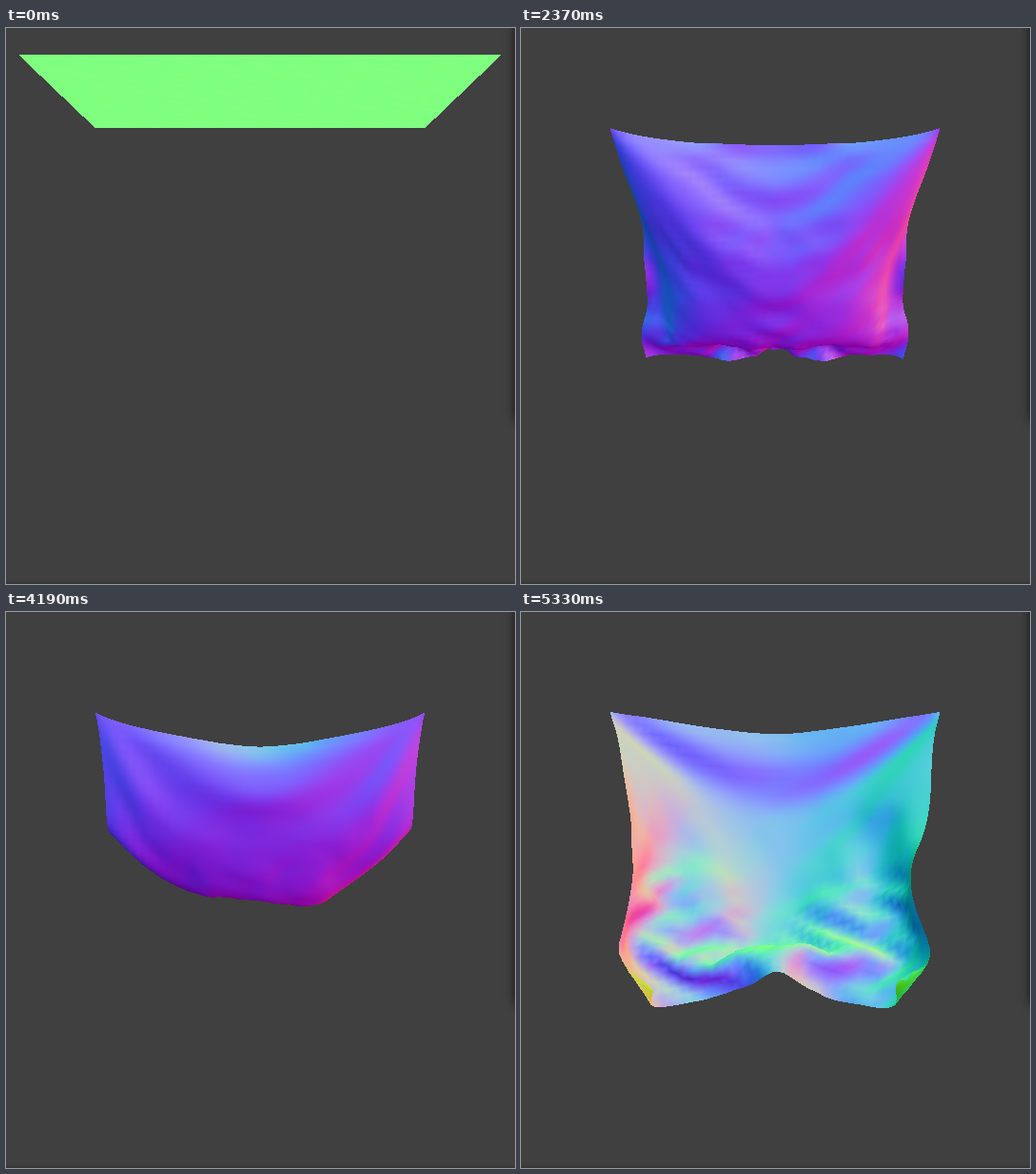
Animation of 535 by 584 pixels, one loop 5.38 s. Source, as an HTML page with a canvas:

```html
<!DOCTYPE html>
<html lang="en">
<head>
<meta charset="utf-8">
<title>Falling cloth</title>
<style>
  html, body { margin: 0; width: 100%; height: 100%; overflow: hidden; background: #404040; }
  canvas { display: block; }
</style>
</head>
<body>
<canvas id="stage" width="535" height="584"></canvas>
<script>
const W = 535, H = 584, LOOP = 5380;
const N = 40, ROW = N + 1, COUNT = ROW * ROW;
const SIZE = 347, PIN_Y = -166, CELL = SIZE / N;
const FOCAL = 1095, CX = 267, CY = 271;
const RATE = 720, DT = 1 / RATE, STEPS = 8;
const GRAVITY = 292, DRAG = 1 - 0.12 * DT, SMOOTH = 0.001, STEER = 0.012;

// Mean path of the free edge: seconds, height, depth
const PATH = [
  [0.99, -20, 303], [1.12, 3, 290], [1.4, 118, 215], [1.66, 218, 82],
  [1.76, 192, 0], [2.23, 95, -170], [2.5, 5, -225], [2.8, -100, -245],
  [2.98, -150, -235], [3.36, -190, -215], [3.65, -200, -205], [3.91, -140, -210],
  [4.19, -15, -215], [4.38, 80, -180], [4.66, 180, -95], [4.86, 212, 20],
  [5, 178, 120], [5.33, 55, 185], [5.45, 25, 190]
];

let seed = 7;
const random = () => (seed = (seed * 16807) % 2147483647) / 2147483647;

// Cloth state: x right, y down, z towards the viewer
const pos = new Float64Array(COUNT * 3);
const old = new Float64Array(COUNT * 3);
const free = new Float64Array(COUNT).fill(1);
free[0] = free[N] = 0;

for (let j = 0, i = 0; j <= N; j++) {
  for (let c = 0; c <= N; c++, i++) {
    pos[i * 3] = c * CELL - SIZE / 2;
    pos[i * 3 + 1] = PIN_Y + (free[i] ? (random() - 0.5) * 0.12 : 0);
    pos[i * 3 + 2] = j * CELL;
  }
}
old.set(pos);

const links = [];
function linkAll(dx, dy, stiff, damp) {
  for (let j = 0; j + dy <= N; j++) {
    for (let c = Math.max(0, -dx); c <= N && c + dx <= N; c++) {
      const a = j * ROW + c, b = a + dy * ROW + dx;
      links.push({ a: a * 3, b: b * 3, wa: free[a], wb: free[b],
        rest: Math.hypot(dx, dy) * CELL, stiff, damp });
    }
  }
}
linkAll(1, 0, 0.28, SMOOTH);
linkAll(0, 1, 0.28, SMOOTH);
linkAll(1, 1, 0.015, 0);
linkAll(-1, 1, 0.015, 0);
linkAll(2, 0, 0.01, 0);
linkAll(0, 2, 0.01, 0);

function solve({ a, b, wa, wb, rest, stiff, damp }) {
  const dx = pos[b] - pos[a], dy = pos[b + 1] - pos[a + 1], dz = pos[b + 2] - pos[a + 2];
  const len = Math.sqrt(dx * dx + dy * dy + dz * dz) || 1e-6;
  const f = stiff * (1 - rest / len) / (wa + wb);
  const fa = f * wa, fb = f * wb;
  if (damp) {
    for (let k = 0; k < 3; k++) {
      const dv = (pos[b + k] - old[b + k] - pos[a + k] + old[a + k]) * damp;
      old[a + k] -= dv * wa;
      old[b + k] += dv * wb;
    }
  }
  pos[a] += dx * fa; pos[a + 1] += dy * fa; pos[a + 2] += dz * fa;
  pos[b] -= dx * fb; pos[b + 1] -= dy * fb; pos[b + 2] -= dz * fb;
}

function pathAt(t, k) {
  let i = 0;
  while (i < PATH.length - 2 && t > PATH[i + 1][0]) i++;
  const p = PATH[i], q = PATH[i + 1], span = q[0] - p[0];
  const slope = n => {
    const l = PATH[Math.max(0, n - 1)], r = PATH[Math.min(PATH.length - 1, n + 1)];
    return (r[k] - l[k]) / (r[0] - l[0]) * span;
  };
  const u = Math.min(1, (t - p[0]) / span), u2 = u * u, u3 = u2 * u;
  return p[k] * (2 * u3 - 3 * u2 + 1) + q[k] * (3 * u2 - 2 * u3)
    + slope(i) * (u3 - 2 * u2 + u) + slope(i + 1) * (u3 - u2);
}

// Drift the sheet gently along the path without changing its speed
function steer(t) {
  for (let k = 1; k < 3; k++) {
    let mean = 0;
    for (let c = 0; c <= N; c++) mean += pos[(N * ROW + c) * 3 + k] / ROW;
    const shift = (pathAt(t, k) - mean) * STEER;
    for (let i = ROW; i < COUNT; i++) {
      const v = Math.floor(i / ROW) / N, d = shift * v * v * v;
      pos[i * 3 + k] += d;
      old[i * 3 + k] += d;
    }
  }
}

let stepNo = 0;
function step() {
  const fall = GRAVITY * DT * DT;
  for (let i = 0; i < COUNT; i++) {
    if (!free[i]) continue;
    for (let k = 0; k < 3; k++) {
      const n = i * 3 + k, p = pos[n];
      pos[n] += (p - old[n]) * DRAG + (k === 1 ? fall : 0);
      old[n] = p;
    }
  }
  if (stepNo & 1) for (let i = links.length - 1; i >= 0; i--) solve(links[i]);
  else for (let i = 0; i < links.length; i++) solve(links[i]);
  const t = ++stepNo * DT;
  if (t > 1) steer(t);
}

const poses = [Float32Array.from(pos)];
function poseAt(ms) {
  const n = Math.floor(ms / 1000 * RATE / STEPS);
  while (poses.length <= n) {
    for (let i = 0; i < STEPS; i++) step();
    poses.push(Float32Array.from(pos));
  }
  return poses[n];
}

// Backdrop with soft dark borders
const ctx = document.getElementById("stage").getContext("2d", { willReadFrequently: true });
ctx.fillStyle = "#404040";
ctx.fillRect(0, 0, W, H);
function border(x, y, w, h, blur, alpha) {
  ctx.shadowBlur = blur;
  ctx.shadowColor = `rgba(0,0,0,${alpha})`;
  ctx.fillRect(x, y, w, h);
}
border(W, -40, 40, 452, 10, 0.7);
border(-40, H + 1, W + 80, 40, 6, 0.5);

const backdrop = ctx.getImageData(0, 0, W, H);
const image = ctx.createImageData(W, H);
const pixels = image.data;
const depth = new Float32Array(W * H);
const verts = new Float32Array(COUNT * 6); // screen x, y, scale, then r, g, b

function project(p) {
  for (let j = 0, i = 0; j <= N; j++) {
    for (let c = 0; c <= N; c++, i++) {
      const l = (c ? i - 1 : i) * 3, r = (c < N ? i + 1 : i) * 3;
      const u = (j ? i - ROW : i) * 3, d = (j < N ? i + ROW : i) * 3;
      const ax = p[r] - p[l], ay = p[r + 1] - p[l + 1], az = p[r + 2] - p[l + 2];
      const bx = p[d] - p[u], by = p[d + 1] - p[u + 1], bz = p[d + 2] - p[u + 2];
      const nx = ay * bz - az * by, ny = az * bx - ax * bz, nz = ax * by - ay * bx;
      const m = 127.5 / (Math.sqrt(nx * nx + ny * ny + nz * nz) || 1);
      const s = FOCAL / (FOCAL - p[i * 3 + 2]), o = i * 6;
      verts[o] = CX + p[i * 3] * s;
      verts[o + 1] = CY + p[i * 3 + 1] * s;
      verts[o + 2] = s;
      verts[o + 3] = 127.5 + nx * m;
      verts[o + 4] = 127.5 - ny * m;
      verts[o + 5] = 127.5 + nz * m;
    }
  }
}

function triangle(a, b, c) {
  const v = verts;
  const x0 = v[a], y0 = v[a + 1], x1 = v[b], y1 = v[b + 1], x2 = v[c], y2 = v[c + 1];
  const area = (x1 - x0) * (y2 - y0) - (x2 - x0) * (y1 - y0);
  if (Math.abs(area) < 1e-6) return;
  const left = Math.max(0, Math.ceil(Math.min(x0, x1, x2) - 0.5));
  const right = Math.min(W - 1, Math.floor(Math.max(x0, x1, x2) - 0.5));
  const top = Math.max(0, Math.ceil(Math.min(y0, y1, y2) - 0.5));
  const bottom = Math.min(H - 1, Math.floor(Math.max(y0, y1, y2) - 0.5));
  for (let y = top; y <= bottom; y++) {
    const py = y + 0.5;
    for (let x = left; x <= right; x++) {
      const px = x + 0.5;
      const e = ((x1 - px) * (y2 - py) - (x2 - px) * (y1 - py)) / area;
      const f = ((x2 - px) * (y0 - py) - (x0 - px) * (y2 - py)) / area;
      const g = 1 - e - f;
      if (e < -1e-4 || f < -1e-4 || g < -1e-4) continue;
      const s = e * v[a + 2] + f * v[b + 2] + g * v[c + 2], n = y * W + x;
      if (s <= depth[n]) continue;
      depth[n] = s;
      for (let k = 0; k < 3; k++) {
        pixels[n * 4 + k] = e * v[a + 3 + k] + f * v[b + 3 + k] + g * v[c + 3 + k];
      }
    }
  }
}

function draw(ms) {
  project(poseAt(ms));
  pixels.set(backdrop.data);
  depth.fill(0);
  for (let j = 0; j < N; j++) {
    for (let c = 0; c < N; c++) {
      const a = (j * ROW + c) * 6, b = a + 6, d = a + ROW * 6, e = d + 6;
      triangle(a, b, d);
      triangle(b, e, d);
    }
  }
  ctx.putImageData(image, 0, 0);
}

const start = performance.now();
function tick() {
  draw((performance.now() - start) % LOOP);
  requestAnimationFrame(tick);
}
tick();
</script>
</body>
</html>
```
